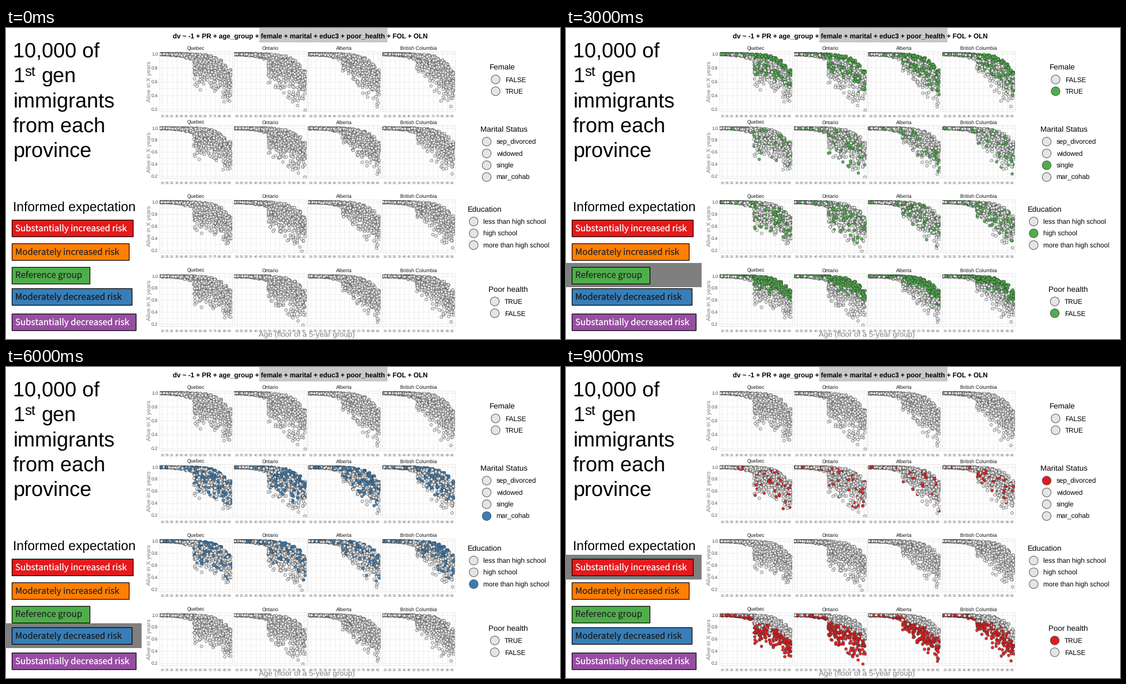
A matplotlib script for the animation above (10000 ms loop, 960 by 540 pixels).

```python
import numpy as np
import matplotlib as mpl
import matplotlib.pyplot as plt
from matplotlib.animation import FuncAnimation
from matplotlib.patches import Circle, Rectangle

mpl.rcParams["text.hinting"] = "none"
W, H, DPI = 960, 540, 100
PX = 72 / DPI  # points per pixel

RED, ORANGE, GREEN, BLUE, PURPLE = "#E41A1C", "#FF7F00", "#4DAF4A", "#377EB8", "#984EA3"
GREY, GRID, MUTED = "#E5E5E5", "#EBEBEB", "#7F7F7F"

fig = plt.figure(figsize=(W / DPI, H / DPI), dpi=DPI, facecolor="white")
ax = fig.add_axes([0, 0, 1, 1])
ax.set_xlim(0, W)
ax.set_ylim(H, 0)
ax.axis("off")


def text(x, y, s, size, color="black", font="Liberation Sans", **kw):
    kw.setdefault("va", "baseline")
    ax.text(x, y, s, fontsize=size * PX, color=color, family=font, **kw)


def box(x0, y0, x1, y1, fill, edge="none", lw=0, z=1):
    r = Rectangle((x0, y0), x1 - x0, y1 - y0, facecolor=fill,
                  edgecolor=edge, linewidth=lw * PX, zorder=z)
    ax.add_patch(r)
    return r


# Heading and formula
for i, line in enumerate(["10,000 of", "1", "immigrants", "from each", "province"]):
    text(12.5, 50.8 + 43.2 * i, line, 36)
text(32.5, 82.5, "st", 24)
text(61.5, 94, "gen", 36)

box(439, 0, 661, 25, "#C8C8C8")
text(289, 18, "dv ~ -1 + PR + age_group + female + marital + educ3 + poor_health + FOL + OLN",
     11.66, weight="bold")

# Risk labels: name, colour, text colour, top and right edge of the box
text(11.5, 318, "Informed expectation", 22.7)
RISKS = [
    ("Substantially increased risk", RED, "white", 333, 220),
    ("Moderately increased risk", ORANGE, "#262626", 373.5, 213),
    ("Reference group", GREEN, "#262626", 414.5, 144.5),
    ("Moderately decreased risk", BLUE, "#1A1A1A", 452, 217.5),
    ("Substantially decreased risk", PURPLE, "white", 496, 225),
]
halos = []
for name, color, ink, top, right in RISKS:
    halos.append(box(0, top - 7, 235, top + 35.5, MUTED))
    box(9.5, top, right, top + 29, color, "black", 1.2, z=2)
    text(16.5, top + 19.5, name, 15.1, ink, "Noto Sans CJK JP")

# Panels
AGES = [19] + list(range(25, 91, 5))
PROVINCES = ["Quebec", "Ontario", "Alberta", "British Columbia"]
PANEL_W, PITCH = 126, 128.5
STEP = PANEL_W / (len(AGES) + 0.2)


def draw_panel(left, one, unit, name):
    """Grid, age labels and title; `one` is the height of 1.0."""
    top, bottom, right = one - 4.5, one + 0.84 * unit, left + PANEL_W
    for k in range(9):
        y = one + 0.1 * k * unit
        ax.plot([left, right], [y, y], color=GRID, lw=(0.5 if k % 2 else 0.9) * PX, zorder=1)
    for k, age in enumerate(AGES):
        x = left + (0.6 + k) * STEP
        ax.plot([x, x], [top, bottom], color=GRID, lw=0.9 * PX, zorder=1)
        text(x, bottom + 9.5, age, 6.1, "#6E6E6E", ha="center")
    text(left + PANEL_W / 2, one - 6.8, name, 8.8, "#1A1A1A", ha="center")
    return box(left, top, right, bottom, "none", "#E2E2E2", 0.8)


# Survival of the riskiest profile at 55 and at 90, per province
WORST_55 = [0.50, 0.56, 0.72, 0.68]
WORST_90 = [0.24, 0.18, 0.16, 0.16]
PER_LEVEL = 60
rng = np.random.default_rng(19)


def sample(p):
    """Age level, survival and the four factor codes for one province."""
    level = rng.permutation(np.repeat(np.arange(len(AGES)), PER_LEVEL))
    n = level.size
    female = rng.integers(0, 2, n)
    marital = rng.choice(4, n, p=[0.18, 0.22, 0.22, 0.38])
    educ = rng.integers(0, 3, n)
    health = rng.choice(2, n, p=[0.42, 0.58])
    risk = (0.40 * (health == 0) + 0.25 * (female == 0)
            + np.array([0.06, 0.13, 0.08, 0])[marital] + 0.075 * (2 - educ))
    risk = np.clip(risk * rng.uniform(0.7, 1.12, n), 0, 1) ** 1.35
    best = 1 - 0.004 * level / 14 - 0.23 * (level / 14) ** 6
    young = 0.985 - 0.07 * (level / 6) ** 2.5
    old = np.interp(level, [7, 14], [WORST_55[p], WORST_90[p]])
    worst = np.where(level < 7, young, old)
    return level, best - (best - worst) * risk, (female, marital, educ, health)


samples = [sample(p) for p in range(4)]
clouds = []  # (row index, factor codes, collection)
for r in range(4):
    one, unit = 45 + PITCH * r, 104.5 if r else 119.5
    for p, name in enumerate(PROVINCES):
        left = 266 + 128.65 * p
        frame = draw_panel(left, one, unit, name)
        level, alive, codes = samples[p]
        x = left + (0.6 + level + rng.uniform(-0.4, 0.4, level.size)) * STEP
        dots = ax.scatter(x, one + (1 - alive) * unit, s=(4.9 * PX) ** 2,
                          linewidths=0.55 * PX, edgecolors=(0.2, 0.2, 0.2, 0.85), zorder=3)
        dots.set_clip_path(frame)
        clouds.append((r, codes[r], dots))
    for k in range(5):
        text(263.5, one + 0.2 * k * unit + 3, f"{1 - 0.2 * k:.1f}", 8.3, "#4D4D4D", ha="right")
    text(248, one + 0.4 * unit, "Alive in X years", 10.2, MUTED,
         rotation=90, ha="center", va="center")
text(438, 536.5, "Age (floor of a 5-year group)", 13.3, MUTED)

# Legends: title, its x and baseline, items
LEGENDS = [
    ("Female", 838, 72, ["FALSE", "TRUE"]),
    ("Marital Status", 822.5, 180, ["sep_divorced", "widowed", "single", "mar_cohab"]),
    ("Education", 800, 318.7, ["less than high school", "high school", "more than high school"]),
    ("Poor health", 836.5, 457.5, ["TRUE", "FALSE"]),
]
keys = []
for title, left, base, items in LEGENDS:
    text(left, base, title, 13.4)
    group = []
    for k, item in enumerate(items):
        y = base + 17.3 + 20.5 * k
        key = Circle((left + 10.4, y), 7.6, facecolor=GREY,
                     edgecolor="#4A4A4A", linewidth=0.9 * PX)
        ax.add_patch(key)
        group.append(key)
        text(left + 27.2, y + 4.3, item, 11.6)
    keys.append(group)

# Legend item lit in each of the four rows, by risk (-1: none)
PICKS = [(-1, 0, -1, 0), (0, 1, 0, -1), (1, 2, 1, 1), (-1, 3, 2, -1), (-1, -1, -1, -1)]
FRAMES = 10


def update(i):
    # Plain, then down the five risks and back up
    risk = 4 - abs(i - 5) if i else None
    picks = PICKS[-1 if risk is None else risk]
    color = GREY if risk is None else RISKS[risk][1]
    on, off = mpl.colors.to_rgba(color, 0.92), mpl.colors.to_rgba(GREY, 0.92)
    for k, halo in enumerate(halos):
        halo.set_visible(k == risk)
    for r, codes, dots in clouds:
        dots.set_facecolor(np.where((codes == picks[r])[:, None], on, off))
    for group, pick in zip(keys, picks):
        for k, key in enumerate(group):
            key.set_facecolor(color if k == pick else GREY)
    return []


anim = FuncAnimation(fig, update, frames=FRAMES, init_func=lambda: update(0),
                     interval=1000, repeat=True, repeat_delay=0, blit=False)
plt.show()
```
